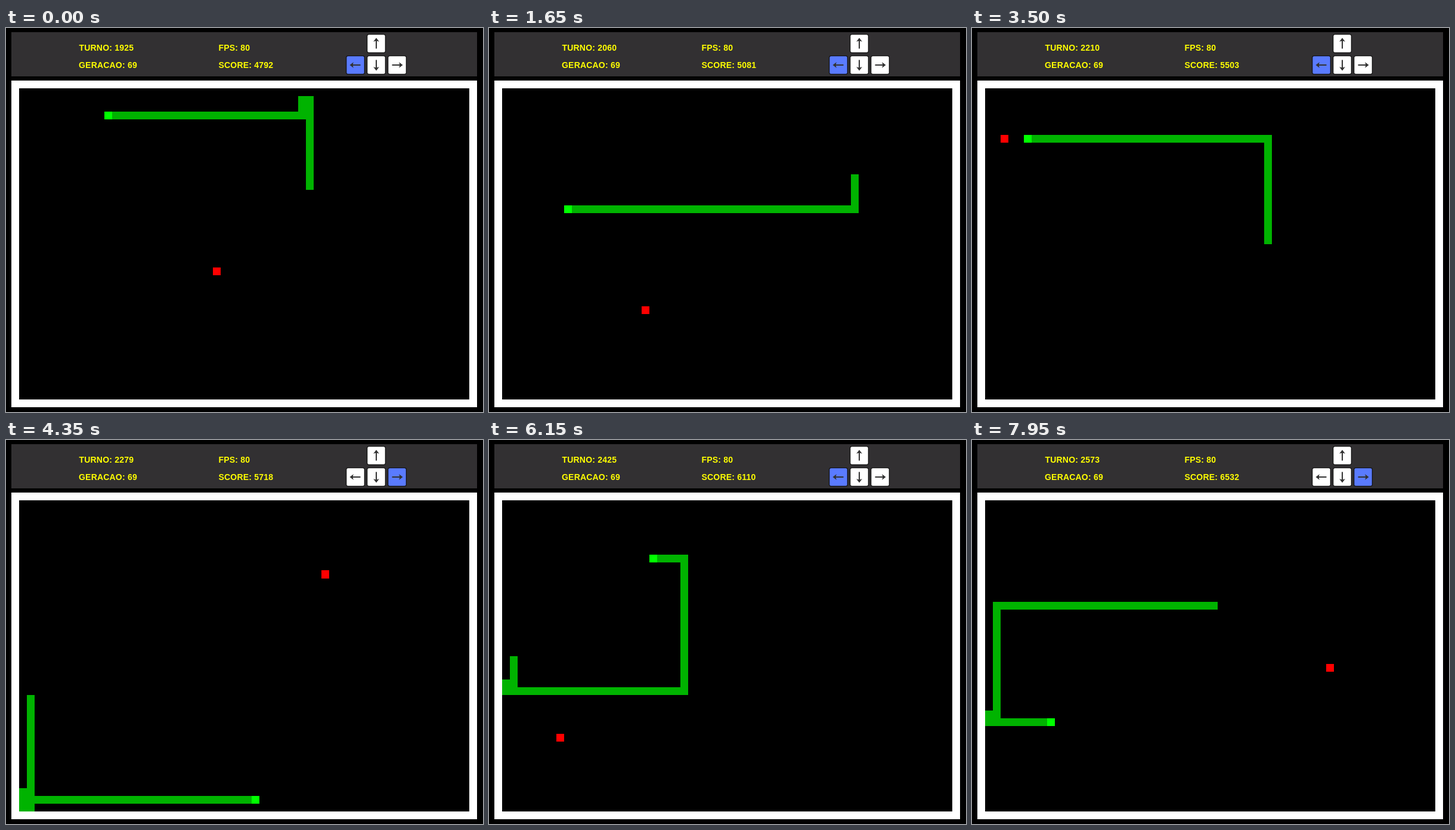
These frames come from a looping animation (800x643 px, 8 s). An HTML page:

```html
<!DOCTYPE html>
<html lang="pt">
<head>
<meta charset="utf-8">
<title>Snake</title>
<style>
  html, body { margin: 0; width: 100%; height: 100%; overflow: hidden; background: #000; }
  svg { display: block; width: 800px; height: 643px; }
  text { font: bold 14px "Liberation Sans", Arial, sans-serif; letter-spacing: .2px; fill: #ff0; white-space: pre; }
  .crisp { shape-rendering: crispEdges; }
</style>
</head>
<body>
<svg viewBox="0 0 800 643">
  <rect width="800" height="643"/>
  <rect class="crisp" x="9" y="7" width="781" height="74" fill="#323032"/>
  <rect class="crisp" x="9" y="88" width="781" height="547" fill="#fff"/>
  <rect class="crisp" x="22" y="101" width="755" height="521"/>
  <text id="turn" x="122.5" y="38"></text>
  <text x="122" y="67">GERACAO: 69</text>
  <text x="356.5" y="38">FPS: 80</text>
  <text id="score" x="356.5" y="67"></text>
  <g id="keys"></g>
  <g class="crisp">
    <path id="food" fill="#f00"/>
    <path id="body" fill="#00b300"/>
    <path id="head" fill="#0f0"/>
  </g>
</svg>
<script>
const $ = id => document.getElementById(id);
const LOOP = 8000, STEP = 50;
const FIRST_TURN = 1925, FIRST_SCORE = 4792, FIRST_LENGTH = 40;

// Turns played by a given step
const PACE = [[0, 0], [33, 135], [53, 216], [87, 354], [107, 435], [140, 568], [159, 648]];

const ROUTE = 'U11 L1 D2 L35 D20 R45 U15 L1 D7 L44 D9 L1 D6 R17 U1 R1 U1 R25 D1 R1 D1 R7 U1 R1 U10 ' +
  'L16 U13 L35 D31 L1 D2 R1 U1 R42 U1 R1 U28 L43 D14 L1 D1 R23 U17 L22 D19 L1 D6 R6 U1 R1 U1 ' +
  'R23 U18 L1 D1 L28 D14 L1 D1 R8';
const FOODS = '25,23 45,8 18,28 51,30 36,19 2,6 1,15 39,9 19,24 23,7 7,30 29,12 0,28 44,21'
  .split(' ').map(p => p.split(',').map(Number));
const DIRS = { U: [0, -1], D: [0, 1], L: [-1, 0], R: [1, 0] };

const trail = [{ x: 37, y: 12, dir: 'U' }];
for (const leg of ROUTE.split(' ')) {
  const dir = leg[0], [dx, dy] = DIRS[dir];
  for (let n = +leg.slice(1); n > 0; n--) {
    const last = trail[trail.length - 1];
    trail.push({ x: last.x + dx, y: last.y + dy, dir });
  }
}

// Play the game once: nearing the food gains a point, leaving it costs one
const gap = (p, [x, y]) => Math.abs(p.x - x) + Math.abs(p.y - y);
const states = [{ score: FIRST_SCORE, eaten: 0 }];
for (let i = FIRST_LENGTH; i < trail.length; i++) {
  let { score, eaten } = states[states.length - 1];
  const now = gap(trail[i], FOODS[eaten]);
  if (now === 0) {
    score += 99;
    eaten++;
  } else {
    score += now < gap(trail[i - 1], FOODS[eaten]) ? 1 : -1;
  }
  states.push({ score, eaten });
}

const KEYS = [['U', 621, 26, 0], ['L', 586, 62, -90], ['D', 621, 62, 180], ['R', 656, 62, 90]];
$('keys').innerHTML = KEYS.map(([dir, x, y, turn]) =>
  `<g transform="translate(${x} ${y})">
    <rect x="-16" y="-16" width="32" height="32" rx="4" fill="#111"/>
    <rect id="key${dir}" x="-14.7" y="-14.7" width="29.4" height="29.4" rx="2.5"/>
    <path transform="rotate(${turn})" d="M0 -9.5L4.8 -3.2L1 -4.2V8.5H-1V-4.2L-4.8 -3.2Z" fill="#333"/>
  </g>`).join('');

const left = i => 22 + 13 * i;
const top_ = j => Math.round(101.3 + 13.02 * j);
const cell = (x, y) => `M${left(x)} ${top_(y)}H${left(x + 1)}V${top_(y + 1)}H${left(x)}Z`;

function turnAt(step) {
  const k = Math.max(1, PACE.findIndex(p => p[0] >= step));
  const [s0, t0] = PACE[k - 1], [s1, t1] = PACE[k];
  return Math.ceil(t0 + (t1 - t0) * (step - s0) / (s1 - s0) - 1e-6);
}

function draw(ms) {
  const turn = turnAt(Math.floor(ms % LOOP / STEP));
  const { score, eaten } = states[turn];
  const tip = turn + FIRST_LENGTH - 1;
  const head = trail[tip];
  const tail = trail.slice(turn - eaten, tip);
  $('body').setAttribute('d', tail.map(p => cell(p.x, p.y)).join(''));
  $('head').setAttribute('d', cell(head.x, head.y));
  $('food').setAttribute('d', cell(...FOODS[eaten]));
  $('turn').textContent = 'TURNO: ' + (FIRST_TURN + turn);
  $('score').textContent = 'SCORE: ' + score;
  for (const [dir] of KEYS) $('key' + dir).setAttribute('fill', dir === head.dir ? '#5a7bff' : '#fff');
}

let start;
function tick(now) {
  start ??= now;
  draw(now - start);
  requestAnimationFrame(tick);
}
draw(0);
requestAnimationFrame(tick);
</script>
</body>
</html>
```
